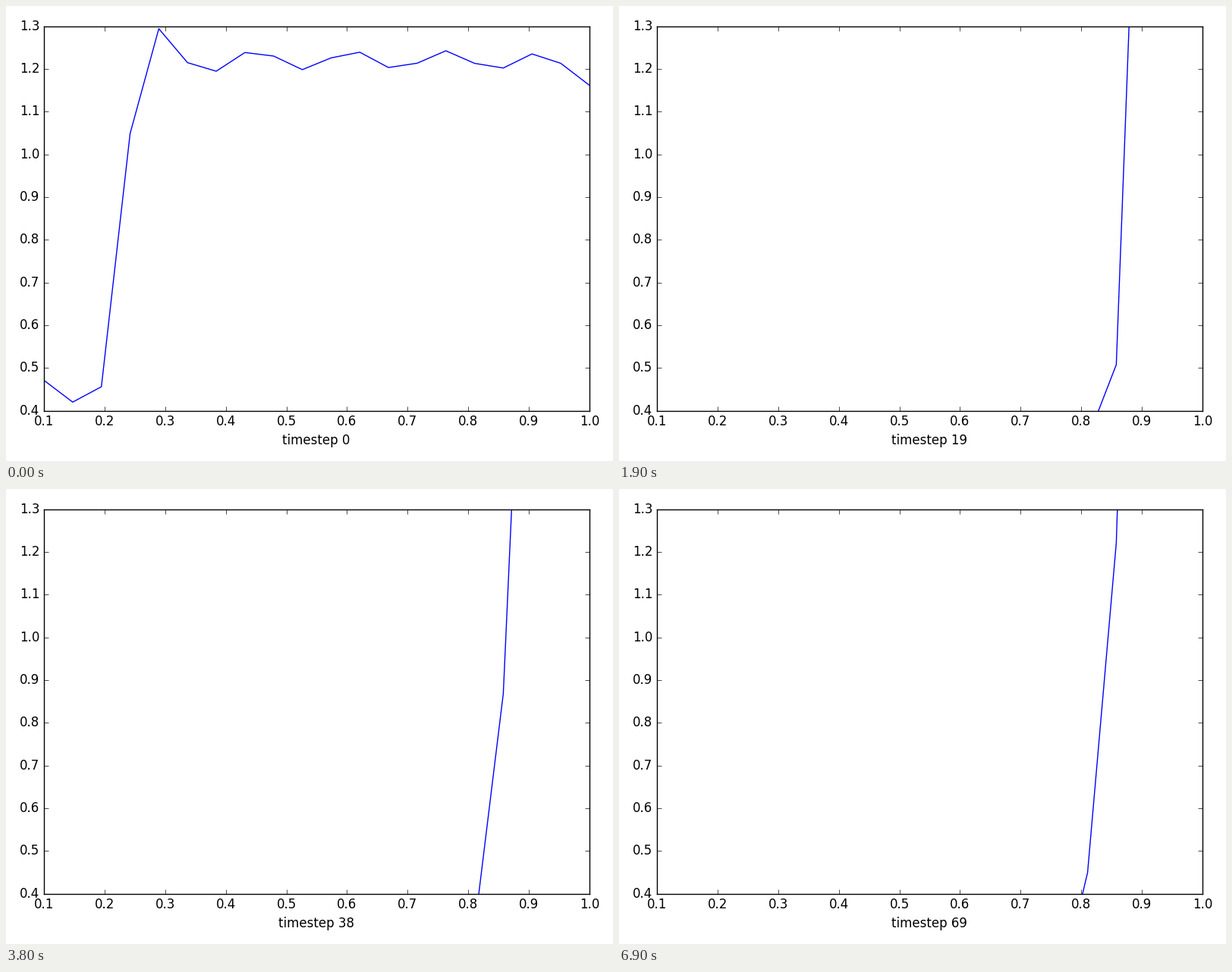
Animation, 800 px wide and 600 px high, one loop 7 s. Source, as a matplotlib script:

```python
import matplotlib.pyplot as plt
import numpy as np
from matplotlib.animation import FuncAnimation

W, H, DPI = 800, 600, 100
STEPS, INTERVAL = 70, 100
LEFT, RIGHT, BOTTOM, TOP = 50.05, 768.9, 66.4, 573.1

plt.rcParams.update({
    "font.family": "DejaVu Sans",
    "font.size": 12,
    "axes.linewidth": 1.0,
    "axes.axisbelow": False,
    "lines.solid_joinstyle": "round",
    "ytick.alignment": "center",
})

points = np.arange(20)
x = np.linspace(0.1, 1.0, points.size)


def initial_curve():
    """Step up to a plateau with a ripple that dies down."""
    swing = 0.022 + 0.053 * np.exp(4 - points)
    ripple = swing * np.cos(2 * np.pi * (points - 4.1) / 3.3)
    y = 1.221 + ripple - 0.037 * (points / 19) ** 20
    y[:4] = 0.471, 0.420, 0.456, 1.049
    return y


def curve(step):
    """Exponential front that runs right, surges once and settles back."""
    if step == 0:
        return initial_curve()
    surge = np.exp(-((step - 23.5) / 4.5) ** 2)
    approach = 13.5 * np.exp(-(step / 6.732) ** 2)
    retreat = 0.35 / (1 + np.exp((step - 43.5) / 1.5))
    centre = 15.8 + retreat - approach + 1.06 * surge
    steepness = 1 + 1.485 * np.exp(-max(step - 9, 0) / 1.6) + 2.1 * surge
    front = np.exp(np.minimum(steepness * (points - centre), 3))
    bump = 0.73 * surge * np.exp(-((points - 15) / 1.12) ** 2)
    return front + bump


fig = plt.figure(figsize=(W / DPI, H / DPI), dpi=DPI, facecolor="white")
ax = fig.add_axes([LEFT / W, BOTTOM / H, (RIGHT - LEFT) / W, (TOP - BOTTOM) / H])
ax.set_xlim(0.1, 1.0)
ax.set_ylim(0.4, 1.3)
ticks_x, ticks_y = np.linspace(0.1, 1.0, 10), np.linspace(0.4, 1.3, 10)
ax.set_xticks(ticks_x, [f"{v:.1f}" for v in ticks_x])
ax.set_yticks(ticks_y, [f"{v:.1f}" for v in ticks_y])
ax.tick_params(direction="in", length=4, width=0.5, pad=4, top=True, right=True)

line, = ax.plot(x, initial_curve(), color="#0000ff", linewidth=1.0)
label = fig.text(408.9 / W, 22 / H, "timestep 0", ha="center", va="baseline")


def update(step):
    line.set_ydata(curve(step))
    label.set_text(f"timestep {step}")
    return line, label


anim = FuncAnimation(fig, update, frames=STEPS, interval=INTERVAL,
                     repeat=True, repeat_delay=0, blit=False)
plt.show()
```
